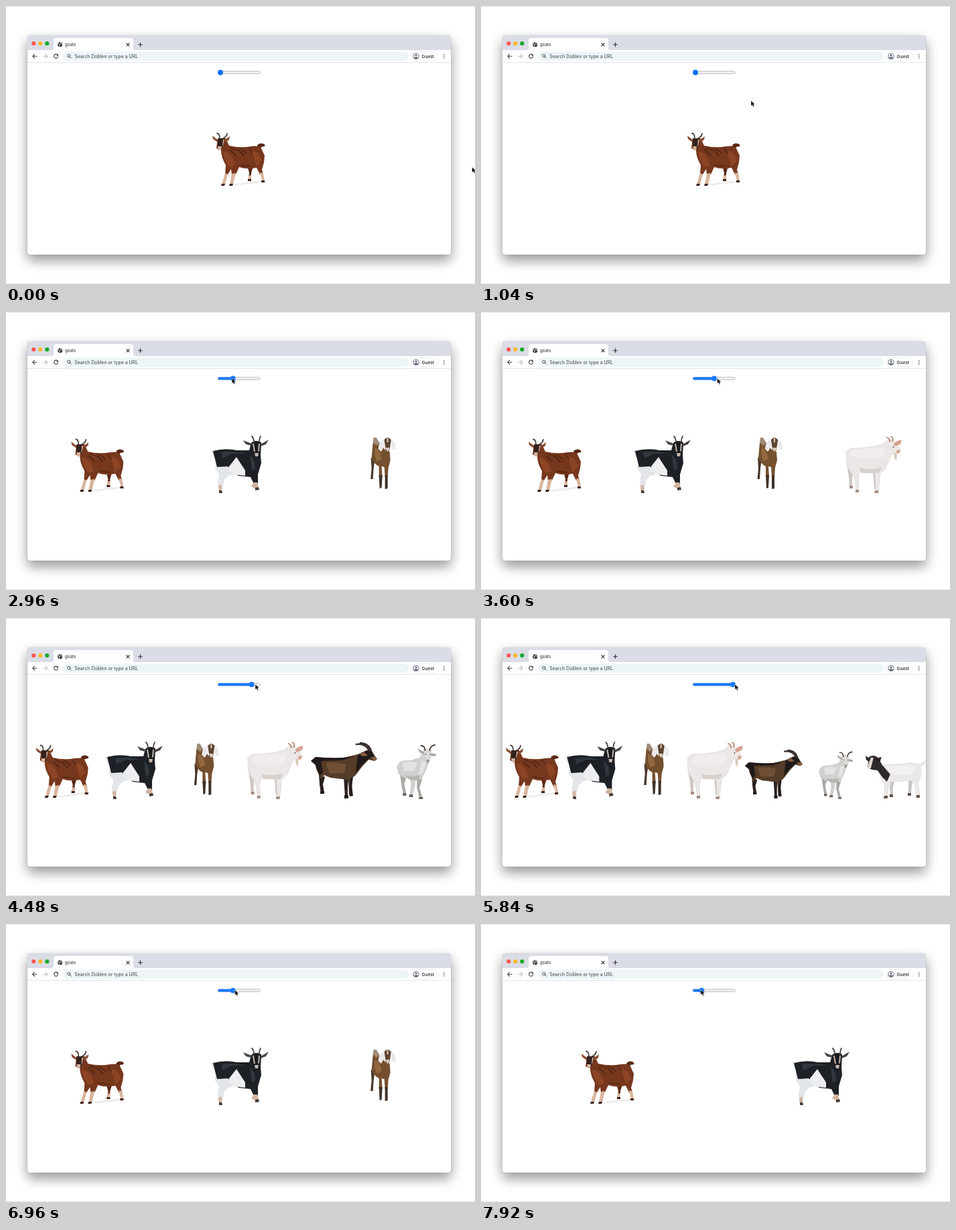
Recreate the animation shown at these times as an HTML page. Size 700 by 416 pixels, loop 8000 ms.

```html
<!DOCTYPE html>
<html lang="en">
<head>
<meta charset="utf-8">
<title>goats</title>
<style>
  html, body { margin: 0; width: 100%; height: 100%; overflow: hidden; background: #fff; }
  svg { position: absolute; inset: 0; width: 100%; height: 100%; display: block; }
  .win { position: absolute; left: 32px; top: 44px; width: 632px; height: 328px; border-radius: 4px; background: #fff;
    box-shadow: 0 0 1px rgba(0,0,0,.4), 0 9px 18px rgba(0,0,0,.36), 0 6px 22px rgba(0,0,0,.07); }
  text { font-family: Inter, Roboto, "Liberation Sans", sans-serif; }
  .line { fill: none; stroke-linecap: round; stroke-linejoin: round; }
  .horn { fill: none; stroke: #4b413d; stroke-width: 1.8; stroke-linecap: round; }
  .goat path { stroke-linejoin: round; }
</style>
</head>
<body>
<div class="win"></div>
<svg viewBox="0 0 700 416">
  <path d="M0 .5H700M0 415.5H700" stroke="#e6e6e6"/>

  <!-- browser chrome -->
  <path d="M32 66V48q0-4 4-4H660q4 0 4 4V66Z" fill="#dadde5"/>
  <circle cx="41.3" cy="56" r="3.1" fill="#fc5650"/>
  <circle cx="51.3" cy="56" r="3.1" fill="#fdb827"/>
  <circle cx="61.3" cy="56" r="3.1" fill="#15a82c"/>
  <path d="M67 66.2q4 0 4-4V52q0-4 4-4H186q4 0 4 4V62.2q0 4 4 4Z" fill="#fff"/>
  <circle cx="80.7" cy="57.7" r="3.5" fill="#2c2f33"/>
  <path d="M78 56.5l2.2 1.3-.4 2.5M81 55.2l.6 1.5 1.8.5" class="line" stroke="#fff"/>
  <text x="88" y="59.9" font-size="6.2" fill="#202124">goats</text>
  <path d="M179.9 55.6l4.2 4.2m0-4.2l-4.2 4.2M200.5 54.8v5.8m-2.9-2.9h5.8" class="line" stroke="#2c2f33" stroke-width="1.1"/>
  <path d="M32 84.5H664" stroke="#e3e5e8"/>
  <path d="M46 75.2h-6.2m2.8-2.9l-2.9 2.9 2.9 2.9M77.2 73.5a3 3 0 1 0 .3 2.6" class="line" stroke="#3c4043" stroke-width="1.1"/>
  <path d="M55.5 75.2h6.2m-2.8-2.9l2.9 2.9-2.9 2.9" class="line" stroke="#babcbe" stroke-width="1.1"/>
  <path d="M78 71.8v2.9h-2.9Z" fill="#3c4043"/>
  <rect x="85" y="68.3" width="516" height="13.8" rx="6.9" fill="#edf5f8"/>
  <path d="M95.9 74.5a2.1 2.1 0 1 0-4.2 0 2.1 2.1 0 1 0 4.200 0M95.400 76.100l2 2" class="line" stroke="#44484c"/>
  <text x="102.3" y="77.7" font-size="6.95" fill="#3c4043">Search Doblen or type a URL</text>
  <rect x="604.5" y="68.5" width="40" height="13.5" rx="6.7" fill="#fff" stroke="#e5e7ea" stroke-width=".8"/>
  <circle cx="612" cy="75.2" r="4.1" fill="#fff" stroke="#5f6575"/>
  <circle cx="612" cy="73.9" r="1.5" fill="#5f6575"/>
  <path d="M608.8 77.5q3.2-2.4 6.4 0-3.2 3.2-6.4 0Z" fill="#5f6575"/>
  <text x="620.5" y="77.6" font-size="6.6" font-weight="500" fill="#202124">Guest</text>
  <path d="M653.7 72.7v0m0 2.5v0m0 2.5v0" class="line" stroke="#3c4043" stroke-width="1.5"/>

  <!-- slider -->
  <rect x="316.5" y="97.6" width="63" height="3.8" rx="1.9" fill="#efefef" stroke="#b4b4b4" stroke-width=".8"/>
  <rect id="fill" class="blue" x="316.3" y="97.5" height="4" rx="2"/>
  <circle id="thumb" class="blue" cy="99.5" r="3.9"/>

  <!-- goats: each drawn around its own centre line -->
  <g class="goat" data-mid="348">
    <path fill="#eeebe9" d="M336 267L382 261 380 264 345 268.500Z"/>
    <path fill="#5a2815" d="M376 213Q373 207 380 205.500 388 206 386 210L381 211 379 216ZM360 238L369 240 366 250 366 257 362 257 363 250Z"/>
    <path fill="#76371d" d="M316 198L328 198 333 209Q350 213 366 210 378 208 381 213L386 224 385 234 382 245 384 252 379 252 374 242Q358 245 348 241L343 252 337 253 336 244 331 252 327 252 328 238Q321 226 321 216L314 213Z"/>
    <path fill="#8c4524" d="M324 218Q336 218 342 238L334 241Q326 232 324 218ZM367 217Q378 216 382 231L374 240Z"/>
    <path class="line" stroke="#42200f" stroke-width="1.200" d="M336 212l10 4M350 213l9 7M347 215l8 9M362 212l6 8M334 215l9 9M349 238l16 2"/>
    <path fill="#d9b59c" d="M327 250L331 252 327 267 322 267ZM337 251L343 250 339 267 334 267ZM379 249L384 250 386 262 382 262ZM362 254L366 253 366 261 361 261Z"/>
    <path fill="#3a2118" d="M322 266h5l-1 3h-5ZM334 266h5l-1 3h-5ZM381 261h5v3h-5ZM361 259h5v3h-5Z"/>
    <path fill="#8b4b31" d="M317 201L308 194 309 199 316 204ZM327 200L334 195 333 200 328 204Z"/>
    <path fill="#35211d" d="M316 198L326 198 325 208 321 216 316 212Z"/>
    <path fill="#d7b6a1" d="M316 210L322 210 321 216 317 216ZM324 200l2 0-2 9-1 1Z"/>
    <path class="horn" d="M319 198Q319 191 315 190.500M324 198Q329 196 330 191"/>
  </g>

  <g class="goat" data-mid="269">
    <path fill="#e3e6e9" d="M227 207L233 208 235 219 230 216ZM233 226L252 229 261 243 253 245 247 251 243 268 238 268 237 254 239 243 233 234Z"/>
    <path fill="#1d2126" d="M230 208Q248 203 266 207L284 207 287 196Q294 190 302 197L301 214 302 226 297 243 297 257 292 259 286 247 268 245 252 231 236 232 233 220Z"/>
    <path fill="#30373e" d="M242 210Q262 207 279 212L258 212 244 219ZM285 214q8 6 8 20l-5 4Z"/>
    <path fill="#eceef0" d="M265 217Q272 228 278 237L278 245 262 243 253 237 254 231Z"/>
    <path fill="#d1b4a1" d="M238 260L243 258 243 268 239 268ZM291 255L296 255 298 263 294 265 287 261Z"/>
    <path fill="#463832" d="M239 267h4l1 4h-5ZM293 263l5-1 1 4-6 1Z"/>
    <path fill="#4a4546" d="M288 197L275 192 279 198 287 200ZM301 198L313 191 309 198 301 201Z"/>
    <path fill="#191b1e" d="M288 195Q295 191 302 195L300 207 297 215H292Z"/>
    <path fill="#c8b7ac" d="M289 197l2 0 2 12-2 0ZM300 197l-2 0-1 12 2-1ZM292 211h6l-1 5h-4Z"/>
    <path class="horn" d="M291 195Q291 189 288 186M299 195Q299 189 301 186"/>
  </g>

  <g class="goat" data-mid="427">
    <path fill="#4a372a" d="M413 218L419 220 417 234 416 250 412.500 250 414 234Z"/>
    <path fill="#75502f" d="M416 196Q420 191 427 197L434 206 441 209 442 222 439 233 438 247 434 247 433 232 429 231 430 247 425 247 425 231Q417 227 414 218Z"/>
    <path fill="#93683f" d="M419 203Q427 206 429 220L422 224Q417 214 419 203Z"/>
    <path fill="#403229" d="M425 244L430 244 429 263 426 264ZM434 244L438 244 438 264 434 265Z"/>
    <path fill="#a08a78" d="M416 195l1-7 4 0 5 8-5 4Z"/>
    <path fill="#ebe8ec" d="M433 190Q424 194 424 205L428 209Q433 203 435 194ZM443 190Q450 194 450 205L446 207Q442 201 442 194Z"/>
    <path fill="#60432f" d="M433 191Q438 185 443 191L441 206 438 210 435 206Z"/>
    <path fill="#d9cdc3" d="M435 203h6l-1 4-3 2ZM437 189h2v6h-2Z"/>
  </g>

  <g class="goat" data-mid="585">
    <path fill="#cec6c2" d="M546 228L557 236 554 247 554 262 550 262 549 247ZM585 236L598 234 593 248 591 266 587 265Z"/>
    <path fill="#ebe7e6" stroke="#d9d2cf" stroke-width=".6" d="M545 210Q549 202 560 204L588 201 600 197 606 192Q614 188 620 196L626 207 621 212 614 211 609 222 604 234 596 241 593 269 589 269 588 242 566 239 563 250 564 268 560 268 557 248 546 230Z"/>
    <path fill="#f0edec" d="M552 208Q575 202 601 204L602 217Q579 223 553 217Z"/>
    <path fill="#d8d0cc" d="M565 233Q582 238 598 232L594 241H568Z"/>
    <path fill="#a58d82" d="M550 260h5v4h-5ZM559 266h5v4h-5ZM588 267h5v4h-6Z"/>
    <path fill="#d6a28f" d="M616 197Q622 191 628 192L626 198 618 201ZM620 207l6-1-1 5-4 1Z"/>
    <path fill="#d9cbbb" d="M616 211L621 211 620 223 617 219Z"/>
    <path class="line" stroke="#b48570" stroke-width="1.800" d="M610 194Q610 189 606 188M614 193Q616 188 612 186.500"/>
    <circle cx="615.500" cy="202" r=".9" fill="#4c3d39"/>
  </g>

  <g class="goat" data-mid="506" data-shrink="1">
    <path fill="#28211e" d="M467 234L476 238 473 249 475 261 470 263 468 249ZM504 238L512 236 510 252 510 268 506 268 505 252Z"/>
    <path fill="#553c29" d="M455 214L462 208Q484 210 504 209L525 204 538 198Q546 196 549 204L554 211 550 214 541 212 531 223 522 235 516 240 517 265 512 265 511 242 484 239 475 235 470 241 463 226 461 215Z"/>
    <path fill="#1f1a19" d="M455 214L462 208Q486 211 503 209L520 207 502 213 470 214 473 231 468 236 462 220ZM525 205L538 199 544 209 532 219 522 232Z"/>
    <path fill="#6f5036" d="M477 217Q493 215 508 219L505 232 483 233Z"/>
    <path fill="#201b1a" d="M514 240L518 238 516 252 518 266 513 267 512 252ZM469 259h6v4h-6ZM505 265h6v5h-6Z"/>
    <path fill="#836046" d="M535 201L526 203 533 207 540 206ZM548 205l6 6-4 3-4-5Z"/>
    <path fill="#211c1b" d="M538 198L546 200 550 208 543 208Z"/>
    <path class="line" stroke="#37302d" stroke-width="2.600" d="M543 199Q536 187 523 189M545 199Q542 188 529 187"/>
  </g>

  <g class="goat" data-mid="611" data-shrink="1">
    <path fill="#aaa9a6" d="M587 230L598 237 594 248 597 263 593 265 590 250ZM613 238L621 240 617 254 621 269 617 270 613 254Z"/>
    <path fill="#d0d1ce" d="M583 222Q587 211 603 213L617 209 622 198Q628 192 635 199L634 209 631 216 626 229 620 241 611 242 610 253 606 267 602 266 604 250 603 240 594 239 585 233Z"/>
    <path fill="#e2e3e0" d="M591 217Q602 213 614 217L609 229 594 229ZM620 214L627 215 622 233 615 235Z"/>
    <path fill="#b6b5b0" d="M594 235Q605 239 617 235L616 243 602 242Z"/>
    <path fill="#6b615b" d="M592 262h5v4h-5ZM602 264h5v4h-6ZM616 268h6v3h-6Z"/>
    <path fill="#aaa5a1" d="M624 201L614 195 617 201 624 204ZM633 202L642 204 640 207 633 206Z"/>
    <path fill="#dcdbd8" d="M623 198Q629 194 635 199L632 213 629 217 626 213Z"/>
    <path fill="#9b928d" d="M627 212h5l-2 5h-2Z"/>
    <path class="horn" d="M625 198Q625 191 619 191M632 198Q633 191 640 190"/>
    <path class="line" stroke="#444" stroke-width="1.600" d="M626 204v0m6.500 0v0"/>
  </g>

  <g class="goat" data-mid="619">
    <path fill="#c9c6c4" d="M611 240L618 242 615 253 615 266 611 267 610 252ZM638 240L645 240 643 253 642 264 638 264 638 252Z"/>
    <path fill="#ebe9e7" stroke="#d8d4d1" stroke-width=".6" d="M594 219Q612 220 632 218 645 215 653 219L664 214 665 217 656 222 657 234 653 247 655 266 650 268 648 248 641 243 620 245 609 245 607 267 603 268 602 247 596 239Z"/>
    <path fill="#f3f1f0" d="M606 223Q628 220 648 223L644 234Q624 237 608 232Z"/>
    <path fill="#302b2a" d="M579 208Q588 203 594 211L599 220 611 234 606 245 599 238 592 228 584 227 577 224Z"/>
    <path fill="#27201f" d="M581 211L574 206 575 212 580 216ZM590 210L598 208 596 214 590 215Z"/>
    <path fill="#ddd7d4" d="M582 209L586 209 582 225 577 225 578 219Z"/>
    <path fill="#5e4e46" d="M602 266h5v4h-6ZM610 264h5v4h-5ZM637 262h5v4h-5ZM650 265h5v4h-5Z"/>
  </g>

  <path id="cursor" d="M0 0V8.300L1.900 6.600 3.200 9.500 4.700 8.900 3.500 6H6Z" fill="#000" stroke="#fff" stroke-width=".5"/>
</svg>
<script>
const LOOP = 8000, STEP = 80, FLOOR = 270;
const MIN_X = 320, TRAVEL = 56, MAX = 7, GRAB = 2;
const HOVER = 1920, PRESS = 2160;

// pointer path: time, x, y
const path = [
  [0, 695.5, 241], [240, 624.5, 230.5], [480, 624.5, 230.5], [1040, 403, 141.5],
  [1120, 403, 141.5], [2000, 322, 98.5], [2320, 322, 98.5], [3200, 343, 99],
  [3600, 352.5, 99], [4080, 365, 99], [4480, 372, 99], [4960, 378, 99],
  [5440, 379, 99], [5840, 379, 99], [6560, 355, 98.5], [7440, 325.5, 98.5],
  [7600, 325, 98], [7760, 327, 98], [7920, 328, 98]
];
const goats = [...document.querySelectorAll(".goat")];
const blues = document.querySelectorAll(".blue");
const [fill, thumb, cursor] = ["fill", "thumb", "cursor"].map(id => document.getElementById(id));

function pointer(t) {
  const i = path.findIndex(k => k[0] > t);
  if (i < 0) return path[path.length - 1].slice(1);
  const [a, b] = [path[i - 1], path[i]];
  let p = (t - a[0]) / (b[0] - a[0]);
  if (t >= 480 && t < 2000) p = p * p * (3 - 2 * p);
  return [1, 2].map(j => a[j] + (b[j] - a[j]) * p);
}

function draw(t) {
  const [x, y] = pointer(t);
  const raw = (x - GRAB - MIN_X) / TRAVEL * (MAX - 1);
  const value = t < PRESS ? 0 : Math.round(Math.min(MAX - 1, Math.max(0, raw)));
  const count = value + 1;
  const thumbX = MIN_X + TRAVEL * value / (MAX - 1);
  const color = t >= PRESS ? "#187cff" : t >= HOVER ? "#005cc8" : "#0070ff";

  cursor.setAttribute("transform", `translate(${x} ${y})`);
  thumb.setAttribute("cx", thumbX);
  fill.setAttribute("width", thumbX - 316);
  blues.forEach(el => el.setAttribute("fill", color));

  // equal cells across the window, one goat in the middle of each
  const cell = 632 / count;
  goats.forEach((g, i) => {
    g.style.display = i < count ? "" : "none";
    const scale = count === MAX && g.dataset.shrink ? 0.87 : 1;
    const mid = 32 + cell * (i + 0.5);
    g.setAttribute("transform",
      `translate(${mid} ${FLOOR}) scale(${scale}) translate(${-g.dataset.mid} ${-FLOOR})`);
  });
}

const start = performance.now();
function tick() {
  const t = (performance.now() - start) % LOOP;
  draw(Math.floor(t / STEP) * STEP);
  requestAnimationFrame(tick);
}
tick();
</script>
</body>
</html>
```
